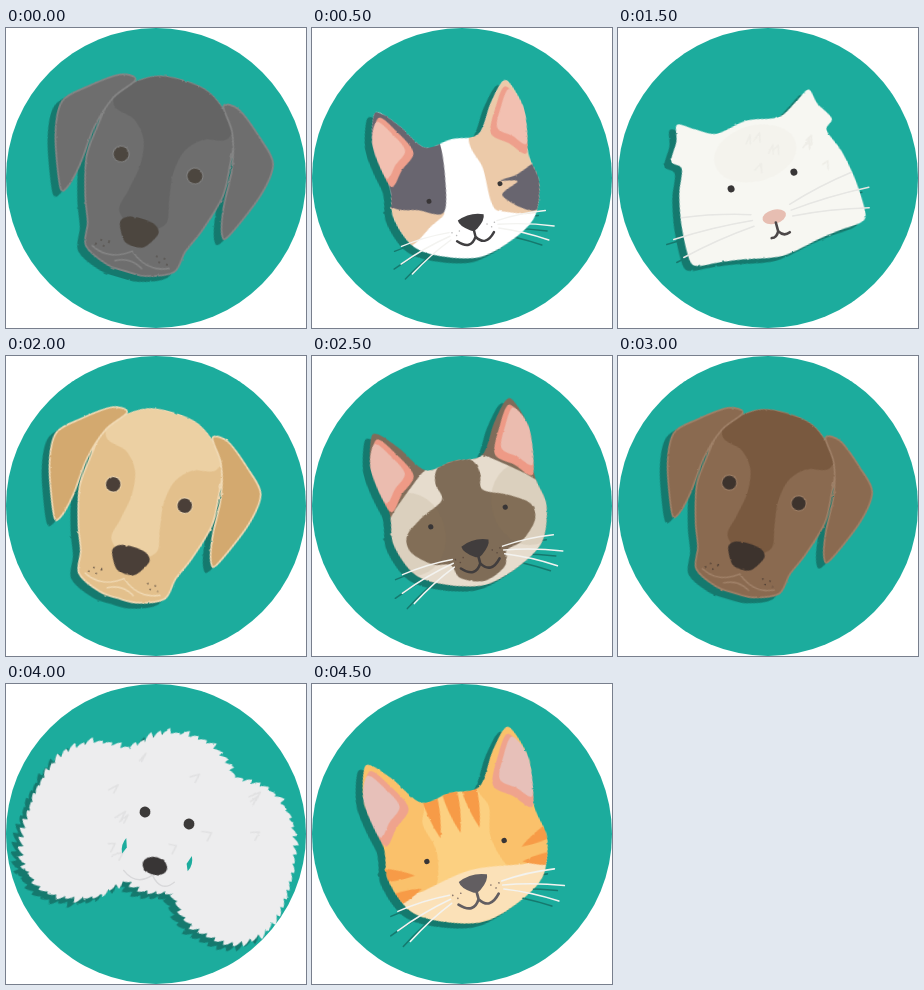
Animation, 300 px wide and 300 px high, one loop 5000 ms. Source, as an HTML page:

```html
<!DOCTYPE html>
<html lang="en">
<head>
<meta charset="utf-8">
<title>Cats and dogs</title>
<style>
html, body { margin: 0; width: 100%; height: 100%; overflow: hidden; background: #fff; }
svg { display: block; width: 100%; height: 100%; }
.pet { display: none; filter: drop-shadow(-7px 5px 0 #15796e); }
.pet.on { display: inline; }
.line { fill: none; stroke-linecap: round; stroke-linejoin: round; }
</style>
</head>
<body>
<svg id="stage" viewBox="0 0 300 300">
  <filter id="rough" x="-5%" y="-5%" width="110%" height="110%" color-interpolation-filters="sRGB">
    <feTurbulence type="fractalNoise" baseFrequency=".2" numOctaves="2" seed="4"/>
    <feDisplacementMap in="SourceGraphic" scale="2" xChannelSelector="R" yChannelSelector="G"/>
  </filter>
  <circle cx="150" cy="150" r="150" fill="#1cac9d"/>
</svg>
<script>
// Every head is drawn upright around the point between its eyes, then posed.
// Symmetric shapes list only their right half, from top to bottom.
const STEP = 500, TEAL = '#1cac9d';
const stage = document.getElementById('stage');
let clipCount = 0, seed = 7;
const random = () => (seed = seed * 16807 % 2147483647) / 2147483647;

const points = text => text.split(' ').map(s => s.split(',').map(Number));
function mirror(text) {
  const half = points(text);
  return [...half, ...half.filter(p => p[0]).reverse().map(([x, y]) => [-x, y])];
}
// Smooth closed curve through the points.
function curve(p) {
  const at = i => p[(i + p.length) % p.length], k = 6.5;
  return 'M' + p[0] + p.map((b, i) => {
    const [a, c, e] = [at(i - 1), at(i + 1), at(i + 2)];
    return `C${b[0] + (c[0] - a[0]) / k},${b[1] + (c[1] - a[1]) / k} ` +
      `${c[0] - (e[0] - b[0]) / k},${c[1] - (e[1] - b[1]) / k} ${c}`;
  }).join('') + 'Z';
}
// Turns a closed curve into a row of slanted tufts.
function furry(d, step, depth) {
  const path = document.createElementNS(stage.namespaceURI, 'path');
  path.setAttribute('d', d);
  const length = path.getTotalLength();
  let out = '';
  for (let s = 0; s < length; s += step) {
    const a = path.getPointAtLength(s), b = path.getPointAtLength((s + step) % length);
    const h = depth * (.3 + random());
    const tip = [b.x + (b.y - a.y) / step * h, b.y - (b.x - a.x) / step * h];
    out += `${s ? 'L' : 'M'}${a.x},${a.y}Q${(a.x + tip[0]) / 2 + (b.y - a.y) * .2},${(a.y + tip[1]) / 2 - (b.x - a.x) * .2} ${tip}`;
  }
  return out + 'Z';
}

const shape = (fill, d, extra = '') => `<path d="${d}" fill="${fill}" ${extra}/>`;
const blob = (fill, text, extra) => shape(fill, curve(points(text)), extra);
const even = (fill, text, extra) => shape(fill, curve(mirror(text)), extra);
const line = (color, d, width) => `<path class="line" d="${d}" stroke="${color}" stroke-width="${width}"/>`;
const oval = (fill, x, y, rx, ry = rx) => `<ellipse cx="${x}" cy="${y}" rx="${rx}" ry="${ry}" fill="${fill}"/>`;
const pair = content => content + `<g transform="scale(-1 1)">${content}</g>`;
const rough = content => `<g filter="url(#rough)">${content}</g>`;
const pose = (x, y, angle, scale, content) =>
  `<g transform="translate(${x},${y}) rotate(${angle}) scale(${scale})">${content}</g>`;
function clip(d, content) {
  const id = 'clip' + clipCount++;
  return `<clipPath id="${id}"><path d="${d}"/></clipPath><g clip-path="url(#${id})">${content}</g>`;
}
// Stripe that narrows from its base to its tip.
function wedge(color, x0, y0, x1, y1, width) {
  const len = Math.hypot(x1 - x0, y1 - y0), nx = (y1 - y0) / len * width / 2, ny = (x0 - x1) / len * width / 2;
  return shape(color, `M${x0 + nx},${y0 + ny}Q${(x0 + x1) / 2 + nx},${(y0 + y1) / 2 + ny} ${x1},${y1}` +
    `Q${(x0 + x1) / 2 - nx},${(y0 + y1) / 2 - ny} ${x0 - nx},${y0 - ny}Z`);
}
// Three gently bent hairs per side.
const whiskers = (x, y, gap, ends, color = '#f3f3f0') => pair(points(ends).map(([ex, ey], i) =>
  line(color, `M${x},${y + gap * i}Q${(x + ex) / 2},${(y + gap * i + ey) / 2 - 3} ${ex},${ey}`, 1.5)).join(''));
// Faint random strokes of fur inside an area.
function tufts(color, count, rx, ry) {
  let d = '';
  while (count--) {
    const a = random() * 6.28, r = Math.sqrt(random());
    d += `M${rx * r * Math.cos(a)},${ry * r * Math.sin(a)}l${4 + random() * 6},${-10 * random()}l-2,9`;
  }
  return line(color, d, 1.6);
}

function cat({ coat, pink, dark, freckle, eye = '#383536', marks }) {
  const outline = curve(mirror('0,-58 29,-56 49,-84 66,-103 74,-100 82,-68 75,-24 79,8 66,42 38,60 0,70'));
  const ear = '69,-98 81,-70 74,-25 58,-39 42,-54 54,-80';
  const dots = [0, 1, 2].map(i => oval(freckle, 15 + 4 * i, 38 + 4 * (i % 2), .8)).join('');
  return rough(shape(coat, outline) + clip(outline, marks) +
      pair(blob(pink[0], ear) + blob(pink[1], ear, 'transform="translate(15.5,-14) scale(.82)"'))) +
    pair(oval(eye, 38.5, 0, 2.6) + dots) +
    shape(dark, 'M-14,27Q0,21 14,27Q14,33 4,40Q0,43 -4,40Q-14,33 -14,27Z') +
    line(dark, 'M0,41V48M-20,48Q-8,61 0,48Q8,61 20,48', 2.6) +
    whiskers(26, 37, 4, '78,39 83,57 74,70');
}
const cheeks = color => pair(oval(color, 60, 2, 35, 42));

const calico = cat({
  coat: '#fff', pink: ['#ee9f8c', '#f2c0b1'], dark: '#403f41', freckle: '#bbb',
  marks: blob('#eccaa9', '-85,-15 -50,4 -26,15 -41,25 -74,40') +
    blob('#68656f', '-95,-115 -25,-70 -13,-58 -16,-20 -26,15 -50,7 -85,-14') +
    blob('#eccaa9', '20,-60 25,-20 25,17 34,29 76,36 100,-20 75,-125') +
    blob('#68656f', '88,-13 58,-5 40,-3 57,2 38,13 66,36 95,20')
});
const siamese = cat({
  coat: '#7f6c5a', pink: ['#ee9a86', '#ebbcaf'], dark: '#413d3d', freckle: '#5e4c40',
  marks: even('#e6dccd', '0,-62 27,-57 44,-46 74,-20 95,10 70,60 0,80') +
    even('#7f6c57', '0,-62 18,-54 23,-40 21,-23 45,-11 64,3 64,20 46,37 29,42 23,57 0,66') +
    cheeks('rgba(150,125,90,.13)')
});
const blackCat = cat({
  coat: '#565557', pink: ['#ee9f8a', '#ecc2b6'], dark: '#373536', freckle: '#777',
  marks: cheeks('#5b5a5c')
});
const tabby = cat({
  coat: '#fcd081', pink: ['#efa38d', '#e7c0b9'], dark: '#625e61', freckle: '#8b796e',
  marks: pair(blob('#fac16b', '29,-62 33,-35 27,-5 40,30 85,45 100,-40 75,-120')) +
    even('#fbe1b8', '0,19 46,26 76,34 60,80 0,85') +
    [-20, 0, 19].map(x => wedge('#f79b47', x, -62, x, -18, 15)).join('') +
    pair(wedge('#f79b47', 90, 0, 53, 10, 14) + wedge('#f79b47', 82, 29, 50, 24, 13))
});

const whiteCat = rough(
    even('#f7f7f2', '0,-62 32,-57 52,-67 68,-76 73,-60 83,-42 75,-32 84,-8 90,24 91,58 84,66 62,68 40,71 0,78') +
    oval('#f4f3ed', 0, -28, 42, 28) + tufts('#eeede7', 9, 65, 55)) +
  pair(oval('#383637', 32.5, 0, 3.5)) + oval('#e7beb2', 2, 38, 12, 7) +
  line('#4c4748', 'M2,44V53Q-1,59 -6,58M2,53Q6,60 13,57', 2.6) +
  whiskers(20, 30, 6, '88,15 101,34 96,54', '#e6e6e3');

function labrador(coat, forehead, rim, dark, earColor = coat) {
  const head = '0,-88 28,-84 52,-67 65,-49 69,-20 71,12 61,50 51,75 46,98 20,110 0,111';
  const edge = `stroke="${rim}" stroke-width="1.8"`;
  const dots = [0, 1, 2, 3].map(i => oval(dark, 25 + 4 * i, 88 + 5 * (i % 2), .8)).join('');
  return rough(
    even(coat, head, edge) +
    clip(curve(mirror(head)), even(forehead, '0,-95 60,-85 60,-46 36,-37 21,-20 17,5 21,32 24,55 0,70')) +
    pair(blob(earColor, '46,-75 62,-76 90,-55 110,-34 107,0 88,48 81,48 75,22 72,-18 62,-52', edge)) +
    line(rim, 'M-40,96Q-20,106 0,90Q20,106 40,96M-14,104Q0,96 14,104', 1.5) +
    even(dark, '0,56 14,58 20,66 11,82 0,85') +
    pair(oval(rim, 38.5, 0, 8.5) + oval(dark, 38.5, 0, 7.5) + dots));
}

const poodle = rough(
    shape('#ededee', furry(curve(mirror('0,-84 22,-81 42,-68 56,-56 90,-53 118,-31 133,12 132,60 120,87 92,103 51,95 35,81 24,70 0,75')), 9, 5)) +
    tufts('#e1e1e2', 12, 115, 55)) +
  pair(shape(TEAL, 'M34,30Q38,38 34,46L31,39Z') + oval('#3c3a39', 22.8, 0, 5.4)) +
  rough(oval('#383535', 1, 49.5, 12.5, 9)) +
  line('#d8d8da', 'M-28,62Q-12,74 1,59Q14,74 24,60', 1.4);

const pets = [
  pose(152, 137, 16.6, 1, labrador('#6e6e6e', '#646464', '#858585', '#4c463f')),
  pose(152.5, 164.5, -14, .95, calico),
  pose(143, 140, 16.6, .95, labrador('#a67c57', '#b98e66', '#c19a75', '#463a33', '#85603f')),
  pose(144.5, 152.5, -15, 1, whiteCat),
  pose(143, 139, 16.6, .97, labrador('#e3c08c', '#ecd0a3', '#f0d9b4', '#4a3f38', '#d3a96f')),
  pose(156, 161, -14.8, 1, siamese),
  pose(146, 137, 16.6, .94, labrador('#8a6a50', '#79593f', '#a08168', '#3d332d')),
  pose(155.5, 164, -14.6, 1, blackCat),
  pose(161, 134, 15.3, 1, poodle),
  pose(153.5, 167, -15.2, 1.04, tabby)
];
stage.insertAdjacentHTML('beforeend', pets.map(art => `<g class="pet">${art}</g>`).join(''));
const groups = [...stage.querySelectorAll('.pet')];

function draw() {
  const current = Math.floor(performance.now() / STEP) % groups.length;
  groups.forEach((g, i) => g.classList.toggle('on', i === current));
  requestAnimationFrame(draw);
}
draw();
</script>
</body>
</html>
```
